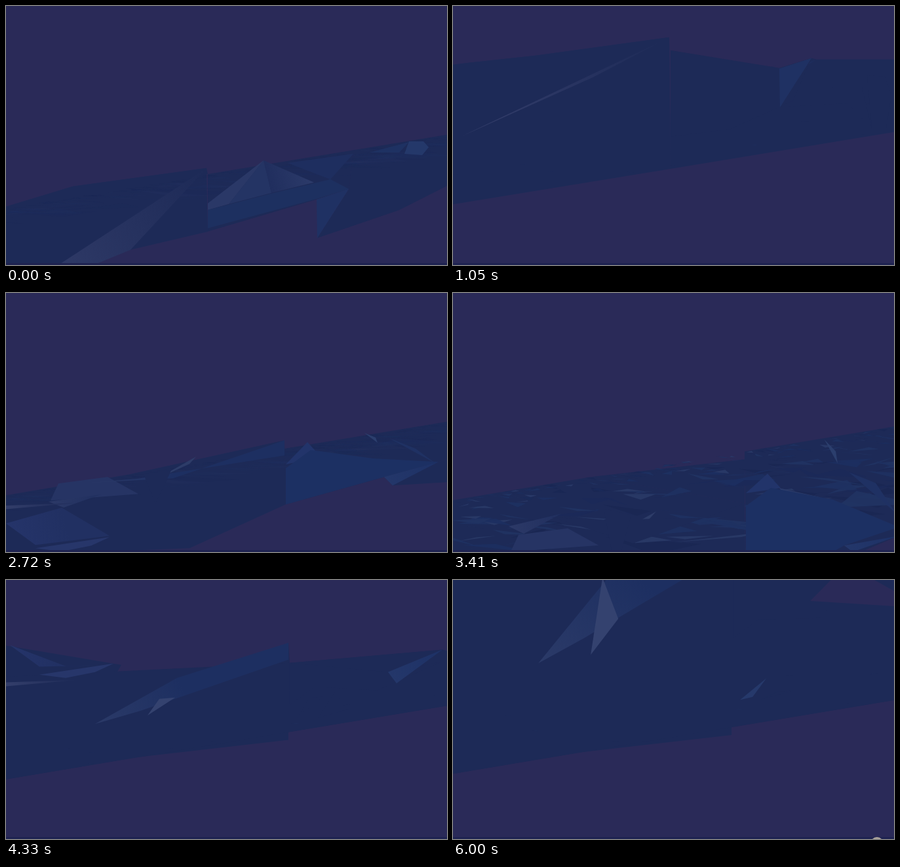
An HTML page with a canvas for the animation above (6.07 s loop, 673 px wide and 396 px high).

```html
<!DOCTYPE html>
<html lang="en">
<head>
<meta charset="utf-8">
<title>Low-poly ridge</title>
<style>
html, body { margin: 0; width: 100%; height: 100%; overflow: hidden; background: #2a2a58; }
canvas { display: block; }
</style>
</head>
<body>
<canvas id="stage" width="673" height="396"></canvas>
<script>
const LOOP = 6070, W = 673, H = 396;
const SKY = '#2a2a58', DARK = '#1d2a57', STRIP = '#1e2351';
const ctx = document.getElementById('stage').getContext('2d');

// Camera path: time, lift, sideways drift
const path = [[0, 0, 0], [560, -84, 14], [1050, -200, 24], [1700, -330, 30], [2720, 0, 0],
  [3410, 105, 20], [4330, -140, 6], [5000, -260, 3], [6070, -330, 0]];

// Smooth curve through the keys without overshoot
function camera(t) {
  const last = path.length - 1;
  const slope = (i, k) => (path[i + 1][k] - path[i][k]) / (path[i + 1][0] - path[i][0]);
  const tangent = (i, k) => {
    if (i === 0 || i === last) return slope(Math.min(i, last - 1), k);
    const a = slope(i - 1, k), b = slope(i, k);
    return a * b <= 0 ? 0 : 2 * a * b / (a + b);
  };
  let i = 0;
  while (i < last - 1 && t > path[i + 1][0]) i++;
  const d = path[i + 1][0] - path[i][0], u = (t - path[i][0]) / d, v = 1 - u;
  const [lift, drift] = [1, 2].map(k =>
    v * v * (1 + 2 * u) * path[i][k] + u * u * (3 - 2 * u) * path[i + 1][k]
    + u * v * d * (v * tangent(i, k) - u * tangent(i + 1, k)));
  return { lift, drift };
}

// Corners are "x,y,nearness" at zero lift; nearer corners move further.
// A clockwise face shows its top colours, a flipped one its dark underside.
const face = (top, corners, under = DARK) => ({
  top: top && top.split('>'),
  under,
  corners: corners.split(' ').map(c => c.split(',').map(Number))
});
const slab = corners => face(DARK, corners);

const firstRidge = {
  from: 0, to: 1700,
  land: [
    slab('-40,312,1.1 0,307,1.1 102,276,1 306,248,1 308,345,.57 190,373,.9 120,396,.9 -40,400,.5'),
    slab('-40,312,1.1 0,307,1.1 102,276,1 306,248,1 308,257,.04 -40,314,.04'),
    slab('308,345,1.36 474,296,1 523,280,1 530,226,.72 720,226,.72 720,189,.04 308,257,.04'),
    slab('523,280,1 475,355,1 600,312,.82 673,275,.56 720,255,.5 720,226,.72 530,226,.72')
  ],
  faces: [
    face('#1e2e5f', '430,240,.55 530,226,.72 495,265,.8'),
    face('#2a3867', '393,236,.56 340,303,1 308,312,1 308,302,.9'),
    face('#243464', '393,236,.56 405,286,.85 340,303,1'),
    face('#2c3b6a>#202e5e', '470,270,.9 405,286,.85 393,236,.56'),
    face('#1d3060', '308,312,.56 400,288,.5 495,265,.6 523,280,1 474,295,1 308,340,1.36'),
    face('#1f3163', '523,280,1 475,355,1 474,296,1'),
    face('#353f6c>#1d2a57', '-10,455,1.28 305,249,1 190,373,1.32'),
    face('#24386a', '608,226,.6 615,207,.1 637,207,.1 645,216,.4 635,228,.6'),
    face('#1e3162', '555,224,.5 615,208,.1 600,224,.5')
  ]
};

const secondRidge = {
  from: 1700, to: LOOP,
  land: [
    slab('-40,316,.04 190,277,.04 425,225,.92 427,323,1.4 280,390,1.78 -40,402,1.8'),
    slab('190,277,.04 425,225,.92 425,250,.04'),
    slab('427,323,1.4 660,258,1.08 720,240,.85 720,189,.04 425,238,.04'),
    slab('577,281,1 660,258,1.08 720,240,.85 720,286,.65 673,289,.67 590,294,.9'),
    slab('-40,347,1.8 170,371,1.72 160,400,1.8 -40,402,1.8')
  ],
  faces: [
    face('#263464', '80,291,.75 155,281,.75 202,307,.75 68,317,.75'),
    face('#2c3967>#202f5f', '65,319,.36 145,308,.28 88,328,.38'),
    face('#2d3c68', '230,284,.8 290,250,.8 280,261,.8'),
    face('#1f3163', '585,222,.5 625,238,.5 655,260,.72'),
    face('#22346a', '460,228,.46 480,250,.46 427,262,.42'),
    face('#2b3b6a', '478,252,.44 540,266,.44 486,262,.44'),
    face('#2b3e6d', '547,214,.1 564,221,.2 567,229,.3'),
    // seen from below, the plane hides what lies on it
    face(null, '-40,316,.04 720,189,.04 660,258,1.08 427,323,1.4 -40,402,1.8'),
    face('#1c3063', '427,323,1.4 427,268,.55 465,240,.55 560,253,.6 660,258,.95 577,281,1'),
    face('#24376a>#1d3166', '577,281,1 660,258,1.08 590,294,.97'),
    face('#25346a>#213062', '0,352,1.8 85,328,1.4 158,371,1.72 45,385,1.8'),
    face('#27366a', '158,373,1.75 130,386,1.75 85,395,1.75 45,390,1.75'),
    face('#343f6b>#1d2a57', '-10,325,1.2 105,321,1.2 -10,331,1.2'),
    face('#2b3a68>#1d2f61', '130,290,.5 255,283,.95 425,225,.92 425,248,.9 200,284,.6'),
    face('#34426f', '210,277,.5 228,322,1 252,271,.65')
  ]
};

const lateGap = {
  from: 4330, to: LOOP,
  land: [],
  faces: [
    face(SKY, '545,146,.35 600,90,.35 720,157,.35', SKY),
    face('#26396b', '438,232,.15 478,199,.15 457,182,.01'),
    face('#1f3063', '470,232,.15 518,218,.15 495,174,.01')
  ]
};

function trace(pts) {
  ctx.beginPath();
  for (const [x, y] of pts) ctx.lineTo(x, y);
  ctx.closePath();
}

function paint({ top, under, corners }, { lift, drift }) {
  const pts = corners.map(([x, y, n]) => [x + drift, y + lift * n]);
  const area = pts.reduce((sum, [x, y], i) => {
    const [x2, y2] = pts[(i + 1) % pts.length];
    return sum + x * y2 - x2 * y;
  }, 0);
  if (area < 0) ctx.fillStyle = under;
  else if (!top) return;
  else {
    const g = ctx.createLinearGradient(...pts[0], ...pts[1]);
    top.forEach((c, i) => g.addColorStop(i, c));
    ctx.fillStyle = g;
  }
  trace(pts);
  ctx.fill();
}

let seed = 7;
const rnd = () => (seed = seed * 16807 % 2147483647) / 2147483647;
const tones = ['#1a2754', '#1e3162', '#1c2f61', '#213363', '#1b2a59', '#2a3a68'];
const chips = Array.from({ length: 260 }, (_, i) => ({
  x: rnd() * 720 - 20,
  near: rnd() ** 2.4,
  tone: tones[i % tones.length],
  form: [-1.2, -0.2, 0.6].map(x => [x + rnd(), rnd() - 0.5])
}));

// Small rocks, densest towards the horizon
function paintChips({ lift, drift }) {
  const above = lift > -20, z = lift + 20;
  chips.forEach((c, i) => {
    if (!above && i % 24) return;
    const near = above ? c.near : c.near * 0.3;
    const y = 309 - 0.167 * c.x + 0.04 * lift + near * z + (above ? 2 : -2);
    const size = above ? 8 + 60 * near : 5 + 6 * near;
    const flat = above ? 0.15 + 0.4 * z / 125 : 0.3;
    ctx.globalAlpha = above ? Math.min(0.9, z / 120) : 0.4;
    ctx.fillStyle = above ? c.tone : '#24386a';
    trace(c.form.map(([u, v]) => [c.x + drift + u * size, y + v * size * flat]));
    ctx.fill();
  });
  ctx.globalAlpha = 1;
}

function draw(t) {
  const cam = camera(t);
  const scenes = [firstRidge, secondRidge, lateGap].filter(s => t >= s.from && t < s.to);
  ctx.fillStyle = SKY;
  ctx.fillRect(0, 0, W, H);
  for (const s of scenes) s.land.forEach(f => paint(f, cam));
  if (cam.lift > -20) paintChips(cam);
  for (const s of scenes) s.faces.forEach(f => paint(f, cam));
  if (cam.lift <= -20) paintChips(cam);
  ctx.fillStyle = STRIP;
  ctx.fillRect(0, 393, W, 3);
  if (t >= 5930) {
    ctx.fillStyle = '#aaa29b';
    ctx.beginPath();
    ctx.arc(647, 403, 10, 0, Math.PI * 2);
    ctx.fill();
  }
}

const start = performance.now();
function tick() {
  draw((performance.now() - start) % LOOP);
  requestAnimationFrame(tick);
}
tick();
</script>
</body>
</html>
```
